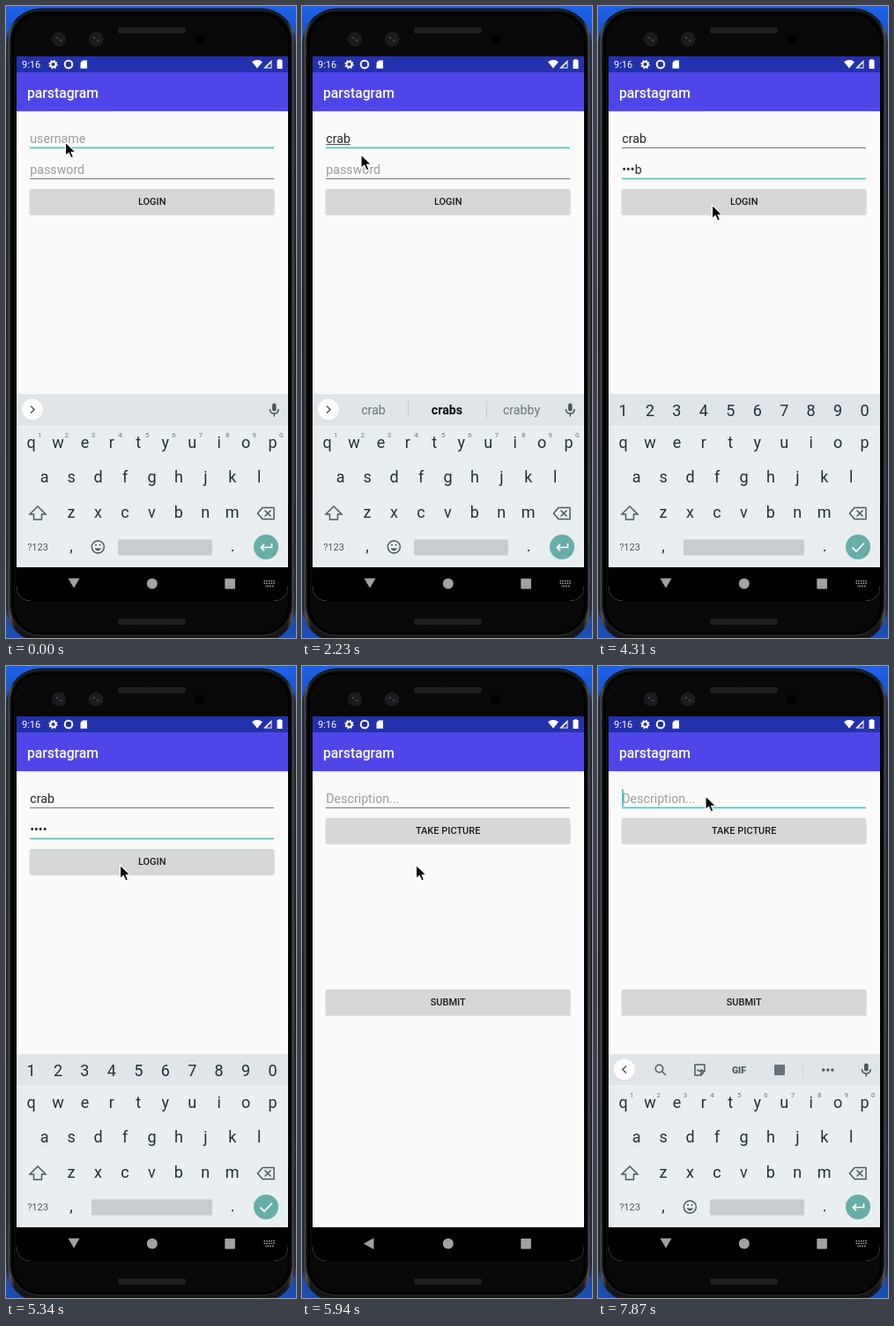
These frames come from a looping animation (329 by 715 pixels, 8000 ms). An HTML page:

```html
<!DOCTYPE html>
<html lang="en">
<head>
<meta charset="utf-8">
<title>Login demo</title>
<style>
html, body { margin: 0; width: 100%; height: 100%; overflow: hidden; background: #12389a; }
svg { display: block; width: 100vw; height: 100vh; font-family: Roboto, sans-serif; }
.mid { text-anchor: middle; }
.field { font-size: 14.2px; fill: #2a2a2a; }
.hint { fill: #9c9c9c; }
.title { font-size: 15.7px; font-weight: 500; fill: #fff; }
.label { font-size: 11px; font-weight: 500; fill: #1d1d1d; text-anchor: middle; }
.key { font-size: 18px; fill: #20303a; text-anchor: middle; }
.small { font-size: 8px; fill: #6a757c; text-anchor: middle; }
.word { font-size: 14.2px; fill: #6b757b; text-anchor: middle; }
.best { fill: #0c0c0c; font-weight: 700; }
.line { fill: none; stroke: #4c5960; stroke-width: 1.5; }
.solid { fill: #4c5960; }
.white { fill: none; stroke: #fff; stroke-width: 2; }
.zoom { transform-origin: 166px 352px; }
</style>
</head>
<body>
<svg viewBox="0 0 329 715" preserveAspectRatio="none">
  <defs>
    <linearGradient id="desk" x2="0" y2="1">
      <stop offset="0" stop-color="#1d63ea"/>
      <stop offset=".12" stop-color="#123a9c"/>
      <stop offset=".5" stop-color="#0b1c4d"/>
      <stop offset="1" stop-color="#1c4fb4"/>
    </linearGradient>
    <linearGradient id="rim" x2="1">
      <stop offset="0" stop-color="#1a1a1b"/>
      <stop offset=".012" stop-color="#545456"/>
      <stop offset=".03" stop-color="#161617"/>
      <stop offset=".97" stop-color="#161617"/>
      <stop offset=".988" stop-color="#545456"/>
      <stop offset="1" stop-color="#1a1a1b"/>
    </linearGradient>
    <pattern id="mesh" width="3" height="3" patternUnits="userSpaceOnUse">
      <path fill="#1b1b1c" d="M0 0h3v3H0z"/><path stroke="#2e2e30" stroke-width=".7" d="M0 3L3 0"/>
    </pattern>
    <clipPath id="glass"><path d="M12 57H320V655Q320 673 302 673H30Q12 673 12 655Z"/></clipPath>
    <g id="bar">
      <path fill="#2431ad" d="M12 57H320V76H12Z"/>
      <path fill="#4f46ea" d="M12 75H320V119H12Z"/>
      <path fill="#000" opacity=".1" d="M12 119H320V120.2H12Z"/>
      <text class="title" x="24" y="103.5">parstagram</text>
    </g>
  </defs>

  <path fill="url(#desk)" d="M0 0H329V715H0Z"/>
  <rect x=".5" y="2.5" width="328" height="717" rx="39" fill="url(#rim)"/>
  <rect x="4.5" y="5" width="320" height="707" rx="34" fill="#0a0a0a" stroke="#2d2d2e"/>
  <rect x="8" y="8.5" width="313" height="701" rx="31" fill="#090909" stroke="#000" stroke-width="2"/>
  <rect x="127" y="24" width="77" height="7" rx="2" fill="url(#mesh)"/>
  <rect x="127" y="693" width="77" height="7" rx="2" fill="url(#mesh)"/>
  <g fill="#1b1c1f"><circle cx="60" cy="37.500" r="8.300"/><circle cx="102" cy="37.500" r="8.300"/></g>
  <g fill="#3d4147"><circle cx="58" cy="36" r="1.300"/><circle cx="62" cy="39" r="1.300"/><circle cx="100" cy="36" r="1.300"/><circle cx="104" cy="39" r="1.300"/></g>
  <circle cx="220" cy="38" r="6" fill="#000"/>

  <g clip-path="url(#glass)">
    <path fill="#fafafa" d="M12 57H320V673H12Z"/>
    <g id="login" class="zoom">
      <path fill="#fafafa" d="M12 57H320V640H12Z"/>
      <use href="#bar"/>
      <text id="user" class="field" x="27.300" y="154.500"></text>
      <rect id="compose" x="27.300" y="156.200" height="1" fill="#333"/>
      <rect id="userLine" x="27"/>
      <text id="pass" class="field" x="27.300" y="189.800"></text>
      <rect id="passLine" x="27"/>
      <g data-button="207 LOGIN"></g>
    </g>
    <g id="post" class="zoom">
      <path fill="#fafafa" d="M12 57H320V640H12Z"/>
      <use href="#bar"/>
      <text class="field hint" x="27.300" y="154.500">Description...</text>
      <rect id="postLine" x="27"/>
      <g data-button="172 TAKE PICTURE"></g>
      <g data-button="366 SUBMIT"></g>
    </g>
    <rect id="caret" width="1.600" height="19.500" fill="#35bfae"/>

    <g fill="#fff">
      <text x="18" y="70" font-size="11">9:16</text>
      <circle cx="53.500" cy="66" r="3" class="white"/>
      <circle cx="53.500" cy="66" r="4.300" fill="none" stroke="#fff" stroke-width="1.700" stroke-dasharray="1.700 1.677"/>
      <circle cx="71" cy="66" r="4.300" class="white"/>
      <path d="M87 61.500H92V70.700H84.500V64Z"/>
      <path d="M279 63.300Q285 58.800 291 63.300L285 70.500Z"/>
      <path d="M301.500 61V70.500H292Z"/><path fill="#2431ad" d="M300.500 64.500V69.500H295.500Z"/>
      <path d="M309 61V60.200H312V61H313.500V71H307.500V61Z"/>
    </g>

    <path fill="#000" d="M12 635H320V673H12Z"/>
    <g fill="#a2a2a2">
      <path id="down" d="M70.500 647.500H83.500L77 658.500Z"/>
      <path id="back" d="M81.500 647V660L70 653.500Z"/>
      <circle cx="165.800" cy="653.500" r="6"/>
      <rect x="248.300" y="647.800" width="11.600" height="11.600" rx=".8"/>
      <path id="kbIcon" fill="none" stroke="#a2a2a2" stroke-width="1.600" stroke-dasharray="1.600 1.100" d="M292.500 650.500H305M292.500 653.200H305M294.500 656.400H295.600M296.500 656.400H301M302 656.400H304"/>
    </g>

    <g id="keyboard" class="zoom">
      <path fill="#e9eef1" d="M12 439H320V635H12Z"/>
      <path fill="#dfe5e8" d="M12 439H320V474H12Z"/>
      <g id="keys"></g>
      <g class="line">
        <path d="M36 566L45 575H40.500V581H31.500V575H27Z"/>
        <path d="M291 567.500H304V580.500H291L285.500 574ZM293.500 570.500L300.500 577.500M300.500 570.500L293.500 577.500"/>
      </g>
      <text x="36" y="616" class="mid" font-size="11" fill="#4c5960">?123</text>
      <rect id="space" y="603.500" height="18" rx="1.500" fill="#c8ccce"/>
      <circle cx="295" cy="612" r="14" fill="#66aea7"/>
      <g id="textKeys">
        <g id="hints"></g>
        <g class="line">
          <circle cx="104.300" cy="612" r="7"/>
          <path d="M100.300 613.500Q104.300 619 108.300 613.500Z" fill="#4c5960" stroke="none"/>
          <path d="M101 609.800H103M105.600 609.800H107.600"/>
          <path stroke="#fff" stroke-width="1.700" d="M301.500 608V612.500H289.500M293 608.800L289.300 612.500L293 616.200"/>
        </g>
        <circle cx="30" cy="457.300" r="12" fill="#cbd1d4"/>
        <circle cx="30" cy="456.500" r="12" fill="#fff"/>
        <path id="chevron" class="line"/>
        <rect x="302" y="449.500" width="4.600" height="9" rx="2.300" class="solid"/>
        <path class="line" stroke-width="1.300" d="M299.500 456Q299.500 461 304.300 461T309.100 456M304.300 461V464.500"/>
        <g id="words">
          <path stroke="#c3cacd" d="M120.500 447V466M209.500 447V466"/>
          <text class="word" x="81" y="462"></text>
          <text class="word best" x="164.500" y="462"></text>
          <text class="word" x="249" y="462"></text>
        </g>
        <g id="tools">
          <g class="line">
            <circle cx="69.500" cy="455.500" r="4.200"/><path d="M72.500 458.500L77 463"/>
            <path d="M110 451H121V458L117 463H110ZM121 458H117V463M112.500 456.500Q115 460 118 456.500"/>
            <path stroke="#cfd6d9" stroke-width="1" d="M232.500 448V465"/>
          </g>
          <text x="160" y="460.500" class="mid solid" font-size="10.500" font-weight="900">GIF</text>
          <rect x="200" y="451" width="12" height="12" rx="1" fill="#667178"/>
          <g class="solid"><circle cx="255.700" cy="457" r="1.700"/><circle cx="260.800" cy="457" r="1.700"/><circle cx="265.900" cy="457" r="1.700"/></g>
        </g>
      </g>
      <g id="passKeys">
        <g id="digits"></g>
        <path class="line" style="stroke:#fff;stroke-width:1.800" d="M288.500 612.500L293 617L302 607.500"/>
      </g>
    </g>
  </g>
  <path id="pointer" d="M0 0V15.500L3.700 12.200L6.300 18L9 16.800L6.500 11.200H11.300Z" fill="#080808" stroke="#fff" stroke-width="1.100" stroke-linejoin="round"/>
</svg>

<script>
const LOOP = 8000;
const NAME = 'crab';
const $ = id => document.getElementById(id);
const show = (id, on) => { $(id).style.display = on ? '' : 'none'; };

function setAttrs(el, attrs) {
  for (const key in attrs) el.setAttribute(key, attrs[key]);
}

function row(parent, chars, x, y, type = 'key', pitch = 30.45) {
  [...chars].forEach((char, i) => {
    $(parent).insertAdjacentHTML('beforeend',
      `<text class="${type}" x="${x + i * pitch}" y="${y}">${char}</text>`);
  });
}

row('keys', 'qwertyuiop', 28.5, 499.5);
row('keys', 'asdfghjkl', 43.7, 539);
row('keys', 'zxcvbnm', 74, 578.5);
row('keys', ',.', 74, 617, 'key', 183);
row('hints', '1234567890', 38.2, 487.5, 'small');
row('digits', '1234567890', 28.5, 463.5);

document.querySelectorAll('[data-button]').forEach(g => {
  const [, top, label] = g.dataset.button.match(/(\d+) (.+)/);
  g.innerHTML = `<rect x="26.600" y="${+top + 0.8}" width="278" height="29" rx="2" fill="#000" opacity=".14"/>
    <rect class="face" x="27" y="${top}" width="277" height="28.500" rx="1.500" fill="#d6d7d7"/>
    <text class="label" x="165.700" y="${+top + 18.3}">${label}</text>`;
});
const loginFace = document.querySelector('#login .face');

// Each step lists only what changes; earlier values carry over.
const initial = {
  user: 0, pass: 0, masked: false, composing: false, words: null, strip: 'plain',
  focus: 'user', caret: false, pressed: false, pointer: [67.5, 154],
  loginScale: 1, postScale: 1, postAlpha: 0,
  kbAlpha: 1, kbScale: 1, kbShift: 0, kbIcon: true
};
const steps = [
  [150, { strip: 'tools' }],
  [450, { caret: true }],
  [900, { caret: false }],
  [1040, { user: 1, caret: true, composing: true, strip: 'words', words: ['c', 'can', 'could'] }],
  [1190, { user: 2, words: ['cr', 'crazy', 'credit'] }],
  [1340, { user: 3, words: ['cra', 'crazy', 'crack'] }],
  [1490, { user: 4, words: ['crab', 'crabs', 'crabby'] }],
  [1940, { caret: false }],
  [2230, { pointer: [67, 168] }],
  [2380, { pointer: [66, 178], caret: true }],
  [2680, { focus: 'pass', composing: false }],
  [3120, { caret: false }],
  [3270, { pass: 1, caret: true }],
  [3420, { pass: 2 }],
  [3570, { pass: 3 }],
  [3720, { pass: 4 }],
  [4020, { pointer: [92, 196] }],
  [4170, { pointer: [123, 220] }],
  [4310, { pointer: [129.5, 225], caret: false }],
  [4750, { caret: true, pressed: true }],
  [4890, { pressed: false }],
  [5340, { caret: false, masked: true }],
  [5490, { loginScale: 1.02, postScale: 0.93, postAlpha: 0.6, kbScale: 1.02, kbAlpha: 0.9, kbIcon: false }],
  [5640, { loginScale: 1.045, postScale: 0.994, postAlpha: 1, kbScale: 1.045, kbAlpha: 0.48 }],
  [5790, { loginScale: 1.05, postScale: 1, kbScale: 1.05, kbAlpha: 0.06 }],
  [5940, { kbAlpha: 0, focus: 'none' }],
  [6080, { pointer: [131, 209] }],
  [6230, { pointer: [132, 175] }],
  [6380, { pointer: [128, 154] }],
  [6520, { pointer: [122, 147] }],
  [6820, { focus: 'post', caret: true }],
  [6970, { kbAlpha: 0.6, kbScale: 1, kbShift: 45, strip: 'plain' }],
  [7120, { kbAlpha: 1, kbShift: 0, kbIcon: true }],
  [7270, { strip: 'tools', caret: false }],
  [7870, { caret: true }]
];

function setField(id, text, hint) {
  $(id).textContent = text || hint;
  $(id).classList.toggle('hint', !text);
  return text ? $(id).getComputedTextLength() : 0;
}

function setLine(id, y, focused) {
  setAttrs($(id), {
    y: focused ? y - 0.4 : y, width: 277, height: focused ? 1.6 : 1,
    fill: focused ? '#43c7b7' : '#767676'
  });
}

function render(s) {
  const passText = s.pass
    ? '•'.repeat(s.masked ? s.pass : s.pass - 1) + (s.masked ? '' : NAME[s.pass - 1]) : '';
  const widths = {
    user: setField('user', NAME.slice(0, s.user), 'username'),
    pass: setField('pass', passText, 'password'),
    post: 0
  };
  setLine('userLine', 160, s.focus === 'user');
  setLine('passLine', 195, s.focus === 'pass');
  setLine('postLine', 160, s.focus === 'post');
  setAttrs($('compose'), { width: s.composing ? widths.user : 0 });

  show('caret', s.caret);
  if (s.caret) setAttrs($('caret'), { x: 27.2 + widths[s.focus], y: s.focus === 'pass' ? 174.3 : 139.3 });
  loginFace.setAttribute('fill', s.pressed ? '#c3c4c4' : '#d6d7d7');

  $('login').style.transform = `scale(${s.loginScale})`;
  $('post').style.transform = `scale(${s.postScale})`;
  $('post').style.opacity = s.postAlpha;
  $('keyboard').style.transform = `translateY(${s.kbShift}px) scale(${s.kbScale})`;
  $('keyboard').style.opacity = s.kbAlpha;

  const secret = s.focus === 'pass';
  show('textKeys', !secret);
  show('passKeys', secret);
  setAttrs($('space'), secret ? { x: 97, width: 137 } : { x: 127, width: 107 });
  show('words', s.strip === 'words');
  show('tools', s.strip === 'tools');
  $('chevron').setAttribute('d', s.strip === 'tools' ? 'M32 452.500L28 456.500L32 460.500' : 'M28 452.500L32 456.500L28 460.500');
  if (s.words) $('words').querySelectorAll('text').forEach((el, i) => { el.textContent = s.words[i]; });

  show('down', s.kbAlpha > 0);
  show('back', s.kbAlpha === 0);
  show('kbIcon', s.kbIcon);
  $('pointer').setAttribute('transform', `translate(${s.pointer})`);
}

const start = performance.now();
let shown = -1;

function frame() {
  const t = (performance.now() - start) % LOOP;
  const passed = steps.filter(([at]) => at <= t);
  if (passed.length !== shown) {
    shown = passed.length;
    render(Object.assign({}, initial, ...passed.map(([, change]) => change)));
  }
  requestAnimationFrame(frame);
}
frame();
</script>
</body>
</html>
```
